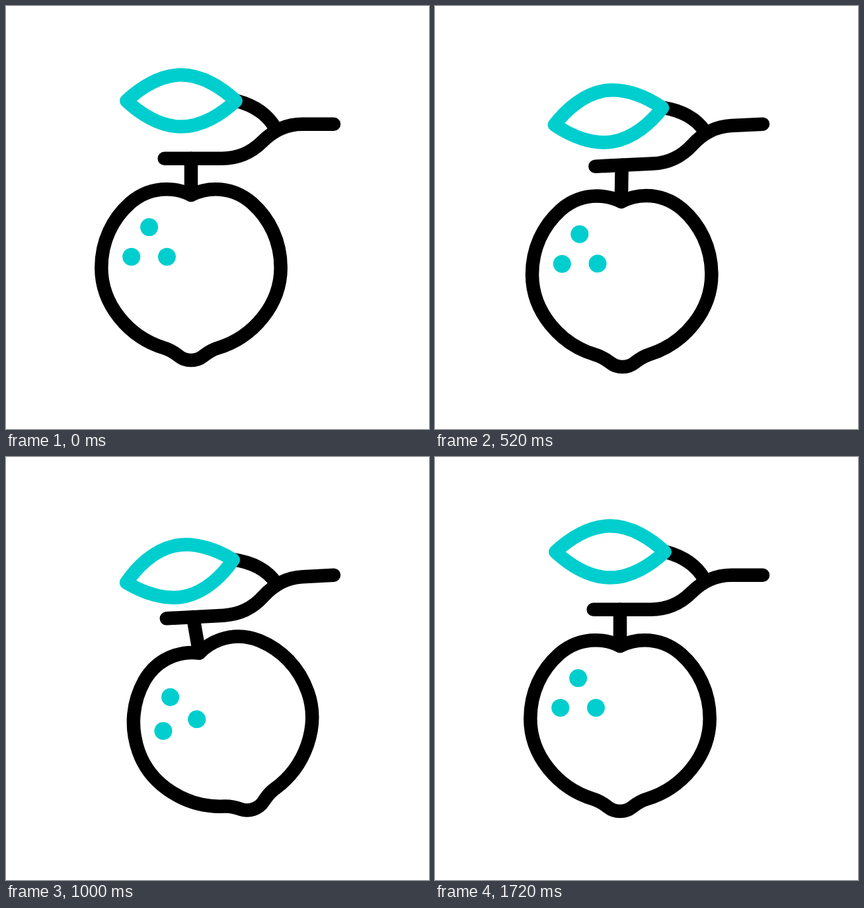
An HTML page for the animation above (2 s loop, 640x640 px).

```html
<!DOCTYPE html>
<html lang="en">
<head>
<meta charset="utf-8">
<title>Swinging fruit</title>
<style>
  html, body { margin: 0; width: 100%; height: 100%; overflow: hidden; background: #fff; }
  svg { display: block; width: 100%; height: 100%; }
  path { fill: none; stroke: #000; stroke-width: 20.5; stroke-linecap: round; stroke-linejoin: round; }
  #leaf path { stroke: #00cece; }
  circle { fill: #00cece; r: 13.5px; }
</style>
</head>
<body>
<svg viewBox="0 0 640 640">
  <g id="branch">
    <path d="M239.7 230.7H326.5C350 230.7 371.5 221.5 388 205S425 178.7 448.5 178.7H496"/>
    <g id="stem">
      <path d="M280 230.7V286"/>
      <g id="fruit">
        <path d="M280 286C268 280 256 277.2 243 277.2C220 277.2 203 285 188 298C161 322 144.3 356 144.3 396C144.3 451 185 501 239.5 517.5C248 520 255 524.5 262 530C272 538 288 538 298 530C305 524.5 312 520 320.5 517.5C375 501 415.7 451 415.7 396C415.7 356 399 322 372 298C357 285 340 277.2 317 277.2C304 277.2 292 280 280 286Z"/>
        <circle cx="216.6" cy="334.6" r="13.5"/>
        <circle cx="189.7" cy="379.4" r="13.5"/>
        <circle cx="243.5" cy="379.4" r="13.5"/>
      </g>
    </g>
    <g id="twig">
      <path d="M349 143.5C377 151 397 166 407.5 185"/>
      <g id="leaf">
        <path d="M182.3 143.5C203 124 233 104.3 265 104.3S327 124 347.7 143.5C327 163 297 182.5 265 182.5S203 163 182.3 143.5Z"/>
      </g>
    </g>
  </g>
</svg>
<script>
  const LOOP = 2000, STEP = 40;

  // All joints turn back on the same beats; only their starts are staggered.
  const BEATS = [285, 718, 1075, 1435, 1720];

  const joint = (id, pivot, start, ...peaks) => ({ el: document.getElementById(id), pivot, start, peaks });

  // Angles at the beats are relative to the parent; missing ones are at rest.
  const joints = [
    joint('branch', '496 178.7', 0, -17.8, 9, -4.6),
    joint('stem', '280 230.7', 64, -20.3, 22.1, -10.5),
    joint('fruit', '280 286.3', 145, -26.9, 18.3, -12.9, 7.4),
    joint('twig', '408 184', 140, -21.7, 11, -5.5),
    joint('leaf', '347.7 143.5', 23, -18.1, 8.7, -7.2)
  ];

  const ease = u => u * u * (3 - 2 * u);

  function angleAt({ start, peaks }, t) {
    const i = BEATS.findIndex(beat => t < beat);
    if (i < 0 || t <= start) return 0;
    const from = i ? BEATS[i - 1] : start;
    const a = peaks[i - 1] ?? 0, b = peaks[i] ?? 0;
    return a + (b - a) * ease((t - from) / (BEATS[i] - from));
  }

  function draw(t) {
    for (const j of joints) {
      j.el.setAttribute('transform', `rotate(${angleAt(j, t).toFixed(3)} ${j.pivot})`);
    }
  }

  let origin;
  function tick(now) {
    origin ??= now;
    const t = (now - origin) % LOOP;
    draw(Math.floor(t / STEP) * STEP);
    requestAnimationFrame(tick);
  }
  draw(0);
  requestAnimationFrame(tick);
</script>
</body>
</html>
```
